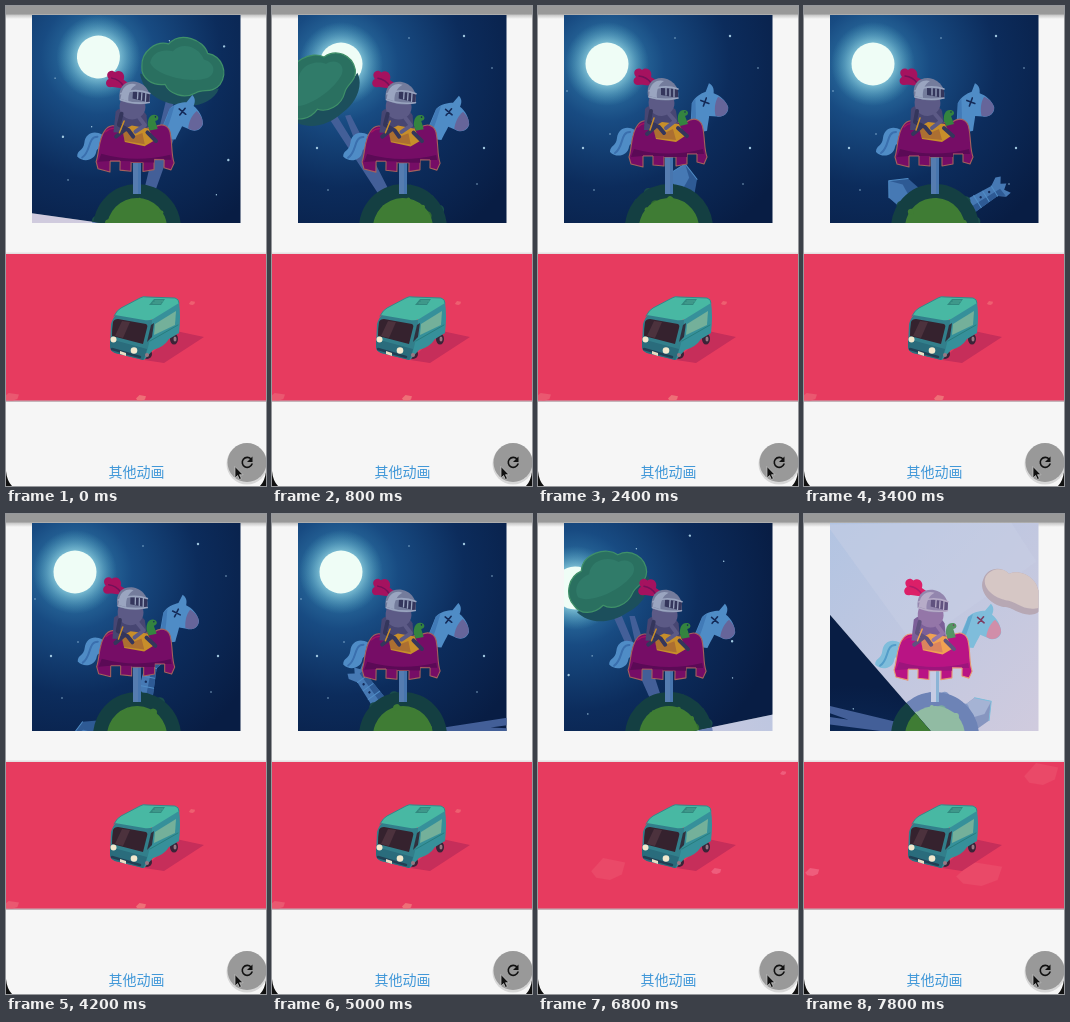
An HTML page for the animation above (8000 ms loop, 260 by 480 pixels).

```html
<!DOCTYPE html>
<html lang="zh">
<head>
<meta charset="utf-8">
<style>
html, body { margin: 0; width: 100%; height: 100%; overflow: hidden; background: #f6f6f6; }
svg { display: block; width: 100%; height: 100%; }
text { font: 14px "Noto Sans CJK SC", "Noto Sans CJK", sans-serif; fill: #3f97d8; }
</style>
</head>
<body>
<svg id="stage" viewBox="0 0 260 480"></svg>
<script>
const LOOP = 8000, STEP = 200, PX = 131, PY = 222;
const stage = document.getElementById('stage');

const night = {
  horse: '#4f8cc6', horseDark: '#3a6fae', muzzle: '#66659a', mark: '#132a58',
  cloth: '#760d66', clothDark: '#5b0a56', trim: '#a5605c', plume: '#a5125f', plumeDark: '#741058',
  steel: '#747c9c', steelLight: '#9aa5c0', steelDark: '#34365c', skin: '#5c5a86', skinDark: '#474672', seat: '#c78e2a', seatDark: '#8b4a3a',
  dragon: '#34843f', pole: '#557cb0', planet: '#143f42', rim: '#1a4c4a', hill: '#3f7c34', hillDark: '#2f6a30',
  leaf: '#2a7060', leafLight: '#358270', leafDark: '#1c4f5c', leafEdge: '#3f9068', trunk: '#435f98', stone: '#4679b4', stoneDark: '#2e5a94'
};
const day = {
  horse: '#7fbddb', horseDark: '#539dc9', muzzle: '#d08ea9', mark: '#7c3d62',
  cloth: '#b91484', clothDark: '#9c157c', trim: '#e79772', plume: '#dc1f68', plumeDark: '#b11b68',
  steel: '#9386ae', steelLight: '#b7acc8', steelDark: '#60527f', skin: '#9476a8', skinDark: '#7b5f98', seat: '#f0a252', seatDark: '#c0606e',
  dragon: '#559565', pole: '#c6cce4', planet: '#6d83b6', rim: '#8399c6', hill: '#91bba3', hillDark: '#7aa9a0',
  leaf: '#c9b8bb', leafLight: '#d6c7c5', leafDark: '#b7a8b4', stone: '#a5b3d4', stoneDark: '#8796c0'
};

const path = (d, fill, more = '') => `<path d="${d}" fill="${fill}" ${more}/>`;
const line = (d, color, w) => path(d, 'none', `stroke="${color}" stroke-width="${w}" stroke-linecap="round" stroke-linejoin="round"`);
const oval = (x, y, rx, ry, fill) => `<ellipse cx="${x}" cy="${y}" rx="${rx}" ry="${ry}" fill="${fill}"/>`;
const dot = (x, y, r, fill) => oval(x, y, r, r, fill);
const soft = (color, w) => `stroke="${color}" stroke-width="${w}" stroke-linejoin="round"`;

function bumps(count, radius, size, color) {
  let out = '';
  for (let i = 0; i < count; i++) {
    const a = i * 2.4, r = size * (.6 + .4 * Math.sin(i * 5));
    out += dot((radius * Math.cos(a)).toFixed(1), (radius * Math.sin(a)).toFixed(1), r.toFixed(1), color);
  }
  return out;
}

const tree = c =>
  path('M-3-40L-5-130L3-130L3-88L10-126L15-124L8-40Z', c.trunk) +
  path('M-37-150C-30-133 -10-126 10-130C26-131 42-142 43-156L30-150H-25Z', c.leafDark) +
  path('M-37-157C-42-172-30-186-17-186C-9-202 16-199 23-187C38-188 48-174 43-160C38-149 28-152 22-146C12-136-4-138-10-146C-22-141-35-146-37-157Z', c.leaf, soft(c.leafEdge, 1.2)) +
  path('M-30-163C-31-175-20-180-11-180C-4-193 14-190 21-180C33-180 37-169 29-163C14-153-22-152-30-163Z', c.leafLight, 'opacity=".6"');

const cloud = c =>
  path('M-33-161C-35-173-24-181-13-178C-4-189 14-186 20-178C32-177 36-164 29-155C20-146 6-150 0-147C-12-141-32-147-33-161Z', c.leafDark) +
  path('M-32-164C-32-174-22-181-13-178C-4-189 14-186 20-178C31-177 35-166 27-160C16-152 5-157-3-153C-16-149-31-153-32-164Z', c.leafLight);

const house = c =>
  path('M-13-40L-15-53L-4-66L12-55L14-40Z', c.stoneDark) +
  path('M-15-53L-4-66L4-54L1-40H-13Z', c.stone) +
  line('M-15-53L-4-66L12-55', c.horse, 1);

const tower = c =>
  path('M-8-38L-6-70L-11-78L-9-83L-3-79L0-84L4-79L10-83L11-77L6-70L8-38Z', c.stone) +
  path('M1-38L1-76L10-77L6-70L8-38Z', c.stoneDark) +
  line('M-6-70H6M-6-60H6M-7-50H7', c.horse, 1) +
  dot(-2, -65, 1.2, c.mark) + dot(-2, -55, 1.2, c.mark);

const horseHead = c =>
  path('M151 126C157 117 161 106 165 97C170 92 177 91 182 91L188 84C191 87 191 91 189 95C194 99 198 106 198 113C196 120 189 121 184 118L177 115C175 119 172 124 170 128Z', c.horse) +
  path('M165 97C162 107 157 117 151 126L157 127C163 117 166 106 170 94Z', c.horseDark, 'opacity=".6"') +
  path('M192 100C197 105 199 111 197 115C193 121 187 120 183 117C184 110 187 104 192 100Z', c.muzzle) +
  line('M174.500 97.500L181 103M180.500 97L175 103.500', c.mark, 1.6);

const rider = c =>
  path('M107 103C112 96 134 96 138 105L141 124H106Z', c.skinDark) +
  path('M115 121L124 116L141 118L147 130L138 136L118 133Z', c.seat) +
  path('M115 124L122 119L126 127L135 123L138 134L118 132Z', c.seatDark, 'opacity=".45"') +
  path('M111 93C112 87 132 86 136 94C138 102 133 109 124 110C114 110 109 102 111 93Z', c.skin) +
  line('M113 105L111 116L121 121L126 127', c.steelDark, 4) +
  line('M131 108L137 115L128 122', c.skin, 4) +
  line('M109 128L117 121M140 122L149 130', c.steelDark, 4) +
  line('M112 124L116 112', c.seat, 1.5) +
  path('M114 78C109 81 106 78 101 79C95 80 94 73 98 71C93 65 100 60 104 64C109 60 115 65 113 71L118 74Z', c.plume) +
  line('M101 70Q109 71 113 77', c.plumeDark, 1.5) +
  path('M110 91C108 78 114 72 124 72C135 73 142 82 140 92C132 96 119 95 110 91Z', c.steel) +
  path('M112 83C114 76 120 73 126 75C121 78 118 84 119 92L111 90Z', c.steelLight) +
  path('M123 82L140 83L140 92L123 89Z', c.steelDark) +
  line('M128 82V89M132 83V90M136 83V91', c.steelLight, 1.3) +
  line('M111 85Q125 78 140 83M111 91Q125 95 140 92', c.steelLight, 1.6) +
  path('M140 115C139 108 142 103 147 104C151 105 151 109 147 110L150 118L142 120Z', c.dragon) +
  dot(147, 106, .8, c.mark);

const tail = c =>
  path('M97 124C88 119 80 123 79 132C78 141 72 139 72 146C79 153 90 149 91 141C92 136 95 138 98 141Z', c.horse) +
  line('M92 126C82 126 86 141 77 147', c.horseDark, 2);

const saddle = c =>
  path('M93 158L91 151C94 142 93 128 99 120C104 112 111 115 120 117L148 116C157 110 164 114 165 123C167 133 166 143 169 151L166 158L159 156V148H149V158L138 160V151H126V160L115 159V150H105V161Z', c.cloth, soft(c.trim, 1.1)) +
  path('M96 143Q130 152 165 143L166 148H159V147H149V151H126V150H115V149H105V150L93 151Z', c.clothDark) +
  line('M100 121Q105 116 112 118', c.plume, 1.2);

function world(c, items) {
  return items.map(([name, draw]) => `<g data-orbit="${name}">${draw(c)}</g>`).join('') +
    `<g data-orbit="ground">${bumps(13, 41, 5, c.rim)}${dot(0, 0, 44, c.planet)}` +
    `${bumps(9, 27, 5, c.hillDark)}${dot(0, 0, 30, c.hill)}${bumps(7, 29, 3.5, c.hill)}</g>` +
    `<rect x="127" y="145" width="8" height="43" fill="${c.pole}"/>` +
    `<rect x="132" y="145" width="3" height="43" fill="${c.horseDark}" opacity=".5"/>` +
    `<g data-part="body">${tail(c)}<g data-part="head">${horseHead(c)}</g>` +
    `${saddle(c)}<g data-part="rider">${rider(c)}</g></g>`;
}

function stars() {
  const spots = [[192, 30], [45, 142], [212, 142], [72, 128], [220, 62], [137, 32], [29, 85], [205, 178], [56, 184]];
  return spots.map(([x, y], i) => dot(x, y, i < 3 ? 1.2 : .7, '#9fc6df')).join('');
}

const van =
  path('M138 354L170 325L198 331L158 357Z', '#c62e5a') +
  dot(141, 348, 5, '#3b2338') + oval(168, 333, 4, 5.5, '#3b2338') +
  path('M146 313L173 296Q175 310 173 327L163 333Q158 341 147 344L138 354L134 353Z', '#36909a') +
  path('M105 318Q107 311 111 308L146 314Q146 332 138 354L109 347Q104 345 104 340Z', '#327f8b') +
  path('M104 333L141 343Q139 351 137 354L109 347Q104 345 104 340Z', '#2a6c7c') +
  path('M109 309Q111 304 115 302L134 292Q137 290 141 291L169 292Q173 293 173 297L147 313Q143 315 138 314Z', '#48b8a3') +
  line('M108 310Q111 304 115 302L134 292Q137 290 141 291L169 292Q173 293 173 297', '#34888a', 1) +
  path('M107 316Q108 313 112 313L140 318Q142 319 141 322L137 338L106 330Q106 322 107 316Z', '#35222e') +
  path('M116 315L124 316L117 332L109 330Z', '#5d3c48', 'opacity=".6"') +
  path('M145 319L148 317L146 331L141 336Z', '#30303e') +
  path('M149 318L170 305L169 319L148 329Z', '#74b09a') +
  path('M148 293L159 293L155 299L143 299Z', '#31897f') +
  line('M147 297H155M149 295H157', '#57b69f', .7) +
  line('M144 335L172 319', '#277d7e', 1) +
  line('M106 343L134 351', '#213f54', 2.5) +
  path('M114 345L120 347V350L114 348Z', '#e7dec5') +
  dot(107.5, 333.5, 3, '#f2e8ce') + dot(128, 344.5, 3.3, '#f2e8ce') +
  dot(141, 349, 2, '#987783') + oval(169, 333, 1.5, 2.5, '#987783');

// x, y, half width, half height, colour
const stones = [
  [186, 297, 3, 2, '#ee5f70'], [5, 391, 8, 4, '#ea5870'], [135, 392, 5, 3, '#ee7077'],
  [-197, 507, 17, 11, '#ea4968'], [-89, 509, 5, 3, '#ef5d7c'], [-22, 411, 3, 2, '#ef5d7c'],
  [-259, 607, 23, 12, '#ea4968'], [-426, 605, 7, 4, '#ef5d7c']
].map(([x, y, w, h, color]) =>
  path(`M${x - w} ${y + h * .2}L${x - w * .3} ${y - h}L${x + w} ${y - h * .6}L${x + w * .8} ${y + h * .5}L${x + w * .1} ${y + h}L${x - w * .7} ${y + h * .8}Z`, color)).join('');

stage.innerHTML = `
<defs>
  <radialGradient id="sky" gradientUnits="userSpaceOnUse" cx="69" cy="58" r="205">
    <stop offset="0" stop-color="#4b9cbb"/><stop offset=".14" stop-color="#296a9c"/>
    <stop offset=".28" stop-color="#184b82"/><stop offset=".6" stop-color="#0c2c5c"/><stop offset="1" stop-color="#081d44"/>
  </radialGradient>
  <radialGradient id="halo"><stop offset=".48" stop-color="#a4e2ec" stop-opacity=".65"/><stop offset="1" stop-color="#5fb9cb" stop-opacity="0"/></radialGradient>
  <linearGradient id="dawn" gradientUnits="userSpaceOnUse" x1="26" y1="9" x2="235" y2="217"><stop stop-color="#b2c4e2"/><stop offset="1" stop-color="#d0cbde"/></linearGradient>
  <linearGradient id="shade" x2="0" y2="1"><stop stop-color="#bbb"/><stop offset="1" stop-color="#f6f6f6"/></linearGradient>
  <clipPath id="view"><rect x="26" y="9" width="208.500" height="208"/></clipPath>
  <clipPath id="upper"><rect data-half x="-400" y="-400" width="800" height="400"/></clipPath>
  <clipPath id="lower"><rect data-half x="-400" width="800" height="400"/></clipPath>
  <clipPath id="road"><rect y="248" width="260" height="146.500"/></clipPath>
</defs>
<rect width="260" height="480" fill="#f6f6f6"/>
<rect y="8" width="260" height="5" fill="url(#shade)"/>
<rect width="260" height="8.500" fill="#999"/>
<g clip-path="url(#view)">
  <g clip-path="url(#lower)">
    <g id="morning"><rect x="-400" y="-400" width="1000" height="1000" fill="url(#dawn)"/>
    <path d="M26 9H210L235 49L112 132Z" fill="#c8cfe4" opacity=".45"/></g>
    ${world(day, [['cloud', cloud], ['house', house]])}
  </g>
  <g clip-path="url(#upper)">
    <g id="heaven"><rect x="-400" y="-400" width="1000" height="1000" fill="url(#sky)"/>
    ${dot(69, 58, 42, 'url(#halo)')}${dot(69, 58, 21.5, '#effdf6')}${stars()}</g>
    ${world(night, [['tree', tree], ['tower', tower], ['house', house]])}
  </g>
</g>
<rect y="246.500" width="260" height="2" fill="#e4dfe1"/>
<rect y="394" width="260" height="2" fill="#c4b4b9"/>
<g clip-path="url(#road)"><rect y="248" width="260" height="147" fill="#e73b5f"/><g id="stones">${stones}</g>${van}</g>
<text x="130.500" y="470.800" text-anchor="middle">其他动画</text>
<path d="M0 465Q1 475 6 480H0ZM260 465Q259 475 254 480H260Z" fill="#111"/>
${dot(241, 458, 20.5, '#d7d7d7')}${dot(241, 456.5, 19.5, '#999')}
${line('M245 453A5 5 0 1 0 246 458', '#111', 1.6)}
${path('M246.500 450.500V456H241Z', '#111')}
${path('M229 460.500V472L231.600 469.500L233.400 473.500L235.400 472.500L233.500 468.700H237Z', '#111', soft('#ccc', .7))}`;

const all = q => [...stage.querySelectorAll(q)];
const move = (q, value) => all(q).forEach(el => el.setAttribute('transform', value));
const ease = p => p < .5 ? 2 * p * p : 1 - 2 * (1 - p) * (1 - p);
const clamp = p => Math.min(1, Math.max(0, p));

// Orbit angles in degrees at time zero, counter-clockwise from the right.
const orbits = { tree: 75, cloud: -395, tower: -167, house: -68, ground: 90 };

function render(ms) {
  const s = ms / 1000;
  // The sky settles into night first, then swings round to day.
  const turn = 180 * ease(clamp((s - 6.4) / 2.22)) - 8 * (1 - clamp(s / .4)) ** 2;
  move('[data-half]', `translate(${PX} ${PY}) rotate(${-turn})`);
  move('#heaven', `rotate(${-turn} ${PX} ${PY})`);
  move('#morning', `rotate(${130 - turn} ${PX} ${PY})`);

  for (const name in orbits)
    move(`[data-orbit="${name}"]`, `translate(${PX} ${PY}) rotate(${90 - orbits[name] - 58.5 * s})`);

  const dip = (1 + Math.cos(2 * Math.PI * (s - .89))) / 2;
  move('[data-part="body"]', `translate(${-dip} ${6 * dip}) rotate(${dip} 130 150)`);
  move('[data-part="head"]', `rotate(${-20 * (1 - dip)} 160 129)`);
  move('[data-part="rider"]', `translate(${2 * dip} ${-2 * dip}) rotate(${3 * dip} 125 125)`);

  const drive = Math.max(0, s - 5.2);
  move('#stones', `translate(${167 * drive} ${-95 * drive})`);
}

function tick() {
  render(Math.floor(performance.now() % LOOP / STEP) * STEP);
  requestAnimationFrame(tick);
}
tick();
</script>
</body>
</html>
```
